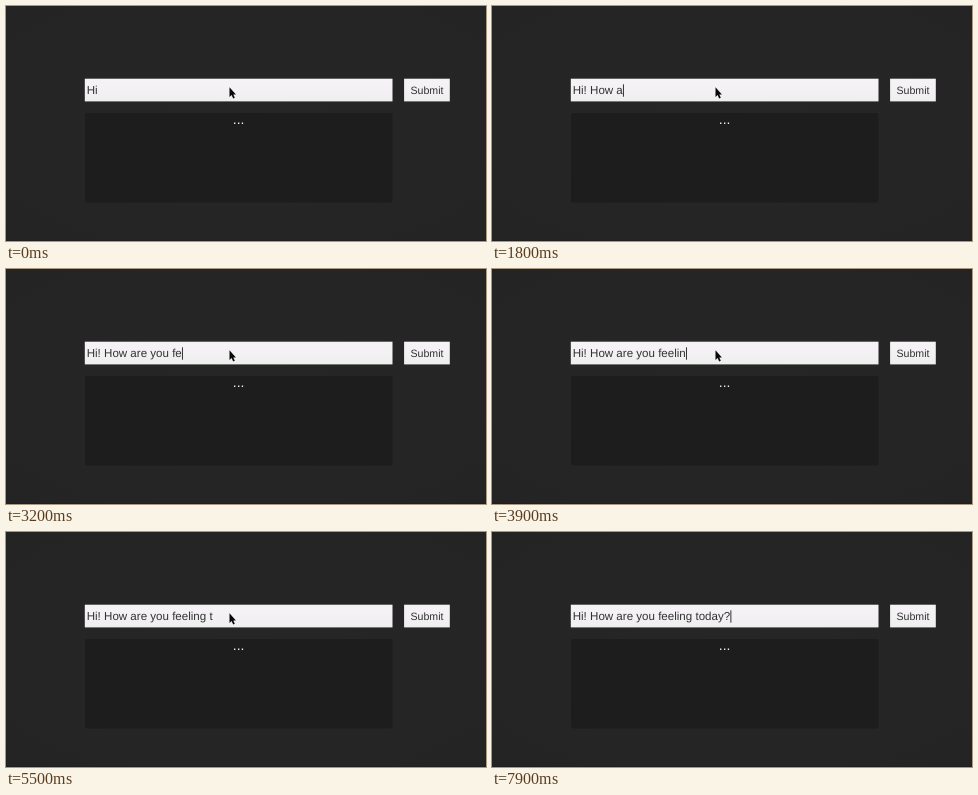
Recreate the animation shown at these times as an HTML page. Size 480x235 px, loop 8 s.

```html
<!DOCTYPE html>
<html lang="en">
<head>
<meta charset="utf-8">
<title>Chat input</title>
<style>
  html, body { margin: 0; width: 100%; height: 100%; overflow: hidden; background: #242424; }
  svg { display: block; width: 100%; height: 100%; }
  text { font-family: "Liberation Sans", Arial, sans-serif; fill: #323232; white-space: pre; text-rendering: geometricPrecision; }
</style>
</head>
<body>
<svg viewBox="0 0 480 235">
  <defs>
    <radialGradient id="room" cx="50%" cy="48%" r="75%">
      <stop offset="0" stop-color="#262626"/>
      <stop offset=".7" stop-color="#252525"/>
      <stop offset="1" stop-color="#232323"/>
    </radialGradient>
    <linearGradient id="field" x2="0" y2="1">
      <stop offset="0" stop-color="#f6f3f6"/>
      <stop offset=".5" stop-color="#f3f1f3"/>
      <stop offset="1" stop-color="#efefef"/>
    </linearGradient>
  </defs>
  <rect width="480" height="235" fill="url(#room)"/>
  <rect y="234" width="480" height="1" fill="#201e1f"/>
  <rect x="79" y="107" width="307.5" height="89.5" rx="2" fill="#1d1d1d"/>
  <rect x="78.8" y="72.7" width="307.7" height="22.7" fill="url(#field)"/>
  <rect x="398.1" y="72.7" width="45.7" height="22.7" fill="url(#field)"/>
  <text x="421" y="88.1" font-size="10.6" text-anchor="middle">Submit</text>
  <text x="232.6" y="117.8" font-size="14" text-anchor="middle" style="fill:#f2f2f2">...</text>
  <text id="typed" x="80.7" y="88.4" font-size="11.57"></text>
  <rect id="caret" y="78.3" width="1" height="12.4" fill="#333"/>
  <path id="mouse" d="M0 0V9.6L2.1 7.8L3.7 11.3L5.3 10.5L3.8 7.2H6.4Z" fill="#080808"/>
</svg>
<script>
const LOOP = 8000, STEP = 100, BLINK = 500, SIZE = 11.57;
const el = id => document.getElementById(id);
const typed = el("typed"), caret = el("caret"), mouse = el("mouse");
const snap = t => Math.floor(t / STEP) * STEP;

// Bursts of evenly paced typing: text, first and last key time
const bursts = [
  ["! Ho", 600, 1100], ["w are yo", 1500, 2500], ["u fee", 2600, 3500], ["ling", 3700, 4100],
  [" ", 4400, 4400], ["t", 5000, 5000], ["oday", 5700, 6100], ["?", 6700, 6700]
];
const keys = bursts.flatMap(([text, from, to]) => [...text].map((char, i) => ({
  char, time: snap(from + (to - from) * i / Math.max(1, text.length - 1))
})));

const pen = document.createElement("canvas").getContext("2d");
pen.font = '100px "Liberation Sans", Arial, sans-serif';
const widthOf = s => pen.measureText(s).width * SIZE / 100;

function draw(t) {
  const pressed = keys.filter(k => k.time <= t);
  const shown = "Hi" + pressed.map(k => k.char).join("");
  const since = pressed.length ? pressed[pressed.length - 1].time : 400;
  const lit = Math.floor((t - since) / BLINK) % 2 === 0;
  typed.textContent = shown;
  caret.setAttribute("x", 80.8 + widthOf(shown));
  caret.setAttribute("visibility", lit ? "visible" : "hidden");

  // The pointer rests, then leaves to the right in quick hops
  const hops = Math.max(0, snap(t) - 7600) / STEP;
  mouse.setAttribute("transform", `translate(${223.5 + 123 * hops} ${81.3 + 9.2 * hops})`);
}

const start = performance.now();
function tick() {
  draw((performance.now() - start) % LOOP);
  requestAnimationFrame(tick);
}
tick();
</script>
</body>
</html>
```
